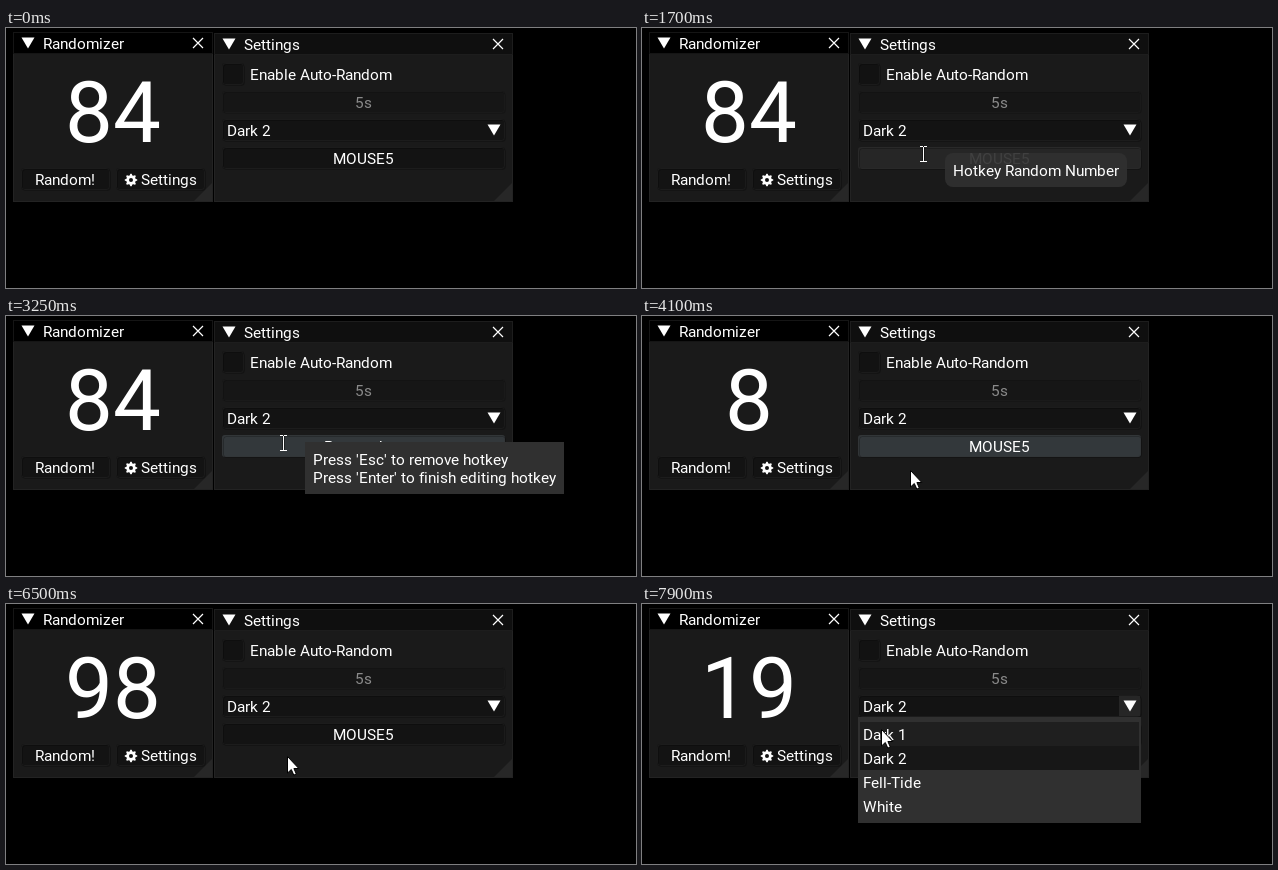
Recreate the animation shown at these times as an HTML page with a canvas. Size 630 px wide and 260 px high, loop 8000 ms.

```html
<!DOCTYPE html>
<html lang="en">
<head>
<meta charset="utf-8">
<title>Randomizer</title>
<style>
html, body { margin: 0; width: 100%; height: 100%; overflow: hidden; background: #000; }
canvas { display: block; }
</style>
</head>
<body>
<canvas id="stage" width="630" height="260"></canvas>
<script>
const ctx = document.getElementById('stage').getContext('2d');
const LOOP = 8000, STEP = 50;
const ENTER = 650, HINT = 1500, EDIT = 1900, PRESS = 3400, CONFIRM = 4600;
const TAPS = 5150, TAP_GAP = 337, LAST_TAP = 6700, THEME_HINT = 7200, OPEN = 7500;
const ROLLS = [84, 8, 5, 27, 53, 92, 98, 19];
const THEMES = ['Dark 1', 'Dark 2', 'Fell-Tide', 'White'];

const FONT = 'Roboto, "Open Sans", sans-serif', EM = 18 / 1.172;
const WHITE = '#fff', POPUP = '#303030', GLASS = 'rgba(48,48,48,.92)', BORDER = 'rgba(48,48,48,.45)',
      FRAME = 'rgba(13,13,13,.54)', HOVER = 'rgba(48,48,48,.54)', ACTIVE = '#33383b';

// Layout: every widget is one line of text plus padding.
const LINE = 18, PAD = 8, GAP = 6, FIELD = 22;
const MAIN = { x: 7, y: 4, w: 200, h: 170 }, SIDE = { x: 208, y: 5, w: 299, h: 169 };
const row = i => ({
  x: SIDE.x + PAD, y: SIDE.y + FIELD + PAD + i * (FIELD + GAP), w: SIDE.w - 2 * PAD, h: FIELD
});
const COMBO = row(2), HOTKEY = row(3);

const mix = (a, b, p) => a + (b - a) * p;
const easeOut = p => 1 - (1 - p) ** 2;
const inside = (p, b) => !!p && p.x >= b.x && p.x < b.x + b.w && p.y >= b.y && p.y < b.y + b.h;

// Pointer stops after its entry: start, end, x, y.
const GLIDES = [
  [HINT, 1700, 281, 126], [2700, 3250, 277, 127], [3700, 4100, 269, 155],
  [4900, 4950, 278, 154], [5500, 6200, 282, 153], [6950, 7250, 260, 109], [OPEN, 7900, 240, 126]
];

function pointerAt(t) {
  if (t < ENTER) return null;
  const q = easeOut(Math.min(1, (t - ENTER) / 800));
  const curve = (a, b, c) => mix(mix(a, b, q), mix(b, c, q), q);
  let x = curve(41, 220, 265), y = curve(0, 185, 123);
  for (const [start, end, toX, toY] of GLIDES) {
    if (t < start) break;
    const p = easeOut(Math.min(1, (t - start + STEP) / (end - start + STEP)));
    x = mix(x, toX, p);
    y = mix(y, toY, p);
  }
  return { x: Math.round(x), y: Math.round(y) };
}

function numberAt(t) {
  const taps = t < TAPS ? 0 : 1 + Math.min(4, Math.floor((t - TAPS + STEP / 2) / TAP_GAP));
  return ROLLS[(t >= PRESS) + taps + (t >= LAST_TAP)];
}

function rect(x, y, w, h, color) {
  ctx.fillStyle = color;
  ctx.fillRect(x, y, w, h);
}

function rounded(x, y, w, h, r) {
  ctx.beginPath();
  ctx.roundRect(x, y, w, h, r);
}

function fillPolygon(points, color) {
  ctx.beginPath();
  points.forEach(([x, y]) => ctx.lineTo(x, y));
  ctx.closePath();
  ctx.fillStyle = color;
  ctx.fill();
}

const advance = ch => Math.round(ctx.measureText(ch).width);

// Glyphs sit on whole pixels, as in a bitmap font atlas.
function text(str, x, y, { color = WHITE, center = false, size = EM } = {}) {
  ctx.font = `${size}px ${FONT}`;
  ctx.fillStyle = color;
  const chars = [...str];
  if (center) x = Math.floor(x - chars.reduce((sum, ch) => sum + advance(ch), 0) / 2);
  for (const ch of chars) {
    ctx.fillText(ch, x, y);
    x += advance(ch);
  }
}

function outline(x, y, w, h, color) {
  ctx.lineWidth = 1;
  ctx.strokeStyle = color;
  rounded(x + .5, y + .5, w - 1, h - 1, 3);
  ctx.stroke();
}

function frame({ x, y, w, h }, color = FRAME) {
  rounded(x, y, w, h, 3);
  ctx.fillStyle = color;
  ctx.fill();
  outline(x + 1, y + 1, w, h, 'rgba(0,0,0,.24)');
  outline(x, y, w, h, 'rgba(48,48,48,.29)');
}

function field(box, label, color, textColor) {
  frame(box, color);
  text(label, box.x + box.w / 2, box.y + 17, { color: textColor, center: true });
}

function downArrow(x, y) {
  fillPolygon([[x, y + 5.6], [x - 6.5, y - 5.6], [x + 6.5, y - 5.6]], WHITE);
}

function cross(x, y) {
  ctx.strokeStyle = WHITE;
  ctx.lineWidth = 1.2;
  ctx.beginPath();
  for (const s of [-5, 5]) {
    ctx.moveTo(x - 5, y - s);
    ctx.lineTo(x + 5, y + s);
  }
  ctx.stroke();
}

function panel(title, { x, y, w, h }, titleColor) {
  const right = x + w - 1, bottom = y + h - 1, grip = LINE;
  rect(x, y, w, h, '#1a1a1a');
  rect(x, y, w, FIELD, titleColor);
  rect(x + 1, y + FIELD - 1, w - 2, 1, BORDER);
  fillPolygon([[right, bottom], [right - grip, bottom], [right, bottom - grip]], '#272727');
  ctx.strokeStyle = BORDER;
  ctx.lineWidth = 1;
  ctx.strokeRect(x + .5, y + .5, w - 1, h - 1);
  downArrow(x + 15, y + 11);
  cross(x + w - 15, y + 11);
  text(title, x + 30, y + 17);
}

function gear(x, y) {
  ctx.fillStyle = WHITE;
  ctx.beginPath();
  for (let i = 0; i < 32; i++) {
    const a = (i - .5) * Math.PI / 16, r = i % 4 < 2 ? 6.3 : 4.7;
    ctx.lineTo(x + r * Math.cos(a), y + r * Math.sin(a));
  }
  ctx.closePath();
  ctx.moveTo(x + 2, y);
  ctx.arc(x, y, 2, 0, Math.PI * 2);
  ctx.fill('evenodd');
}

function tooltip(p, lines, width, radius, color) {
  const x = p.x + 22, y = p.y - 1;
  rounded(x, y, width, 2 * PAD + LINE * lines.length, radius);
  ctx.fillStyle = color;
  ctx.fill();
  lines.forEach((line, i) => text(line, x + PAD, y + 23 + LINE * i));
}

function arrowPointer({ x, y }) {
  const shape = [[0, 0], [0, 16.5], [3.8, 13], [6.3, 18.6], [8.8, 17.5], [6.4, 12], [11.3, 12]];
  fillPolygon(shape.map(([dx, dy]) => [x + dx - .5, y + dy - .5]), WHITE);
  ctx.strokeStyle = '#000';
  ctx.lineWidth = 1;
  ctx.stroke();
}

function textPointer({ x, y }) {
  rect(x - 1, y - 7, 3, 15, 'rgba(0,0,0,.45)');
  rect(x, y - 7, 1, 15, WHITE);
  for (const edge of [y - 8, y + 7]) {
    rect(x - 3, edge, 3, 1, WHITE);
    rect(x + 1, edge, 3, 1, WHITE);
  }
}

function randomizer(value) {
  panel('Randomizer', MAIN, '#000');
  text(String(value), MAIN.x + MAIN.w / 2, 114, { center: true, size: 100 / 1.172 });
  const left = { x: MAIN.x + PAD, y: 140, w: (MAIN.w - 2 * PAD - GAP) / 2, h: FIELD };
  const right = { ...left, x: left.x + left.w + GAP };
  field(left, 'Random!');
  frame(right);
  gear(right.x + 15, right.y + 12);
  text('Settings', right.x + 25, right.y + 17);
}

function settings(s) {
  panel('Settings', SIDE, '#0f0f0f');
  const check = { ...row(0), w: FIELD };
  frame(check);
  text('Enable Auto-Random', check.x + FIELD + GAP, check.y + 17);
  ctx.globalAlpha = .6;
  field(row(1), '5s', FRAME, '#d8d8d8');
  ctx.globalAlpha = 1;

  const button = COMBO.x + COMBO.w - FIELD;
  frame(COMBO, s.overCombo ? HOVER : FRAME);
  if (s.open) rect(button, COMBO.y + 1, FIELD - 1, FIELD - 2, '#262626');
  text('Dark 2', COMBO.x + 5, COMBO.y + 17);
  downArrow(button + 11, COMBO.y + 11);
  field(HOTKEY, s.listening ? 'Press a key' : 'MOUSE5',
        s.editing ? ACTIVE : s.overHotkey ? HOVER : FRAME);
}

function themeList(p) {
  const top = COMBO.y + COMBO.h, itemHeight = LINE + GAP;
  rect(COMBO.x, top, COMBO.w, THEMES.length * itemHeight + 10, POPUP);
  THEMES.forEach((name, i) => {
    const item = { x: COMBO.x + 2, y: top + 5 + itemHeight * i, w: COMBO.w - 4, h: itemHeight };
    const shade = name === 'Dark 2' ? '#171717' : inside(p, item) ? '#1f1f1f' : POPUP;
    rect(item.x, item.y, item.w, item.h, shade);
    text(name, COMBO.x + 5, item.y + LINE);
  });
}

function draw(time) {
  const t = Math.floor(time % LOOP / STEP) * STEP;
  const p = pointerAt(t);
  const open = t >= OPEN;
  const state = {
    open,
    overCombo: !open && inside(p, COMBO),
    overHotkey: !open && inside(p, HOTKEY),
    editing: t >= EDIT && t < CONFIRM,
    listening: t >= EDIT && t < PRESS
  };
  rect(0, 0, 630, 260, '#000');
  randomizer(numberAt(t));
  settings(state);
  if (open) themeList(p);

  if (state.overHotkey && state.editing) {
    tooltip(p, ["Press 'Esc' to remove hotkey", "Press 'Enter' to finish editing hotkey"], 259, 0, POPUP);
  } else if (state.overHotkey && t >= HINT && t < EDIT) {
    tooltip(p, ['Hotkey Random Number'], 182, 8, GLASS);
  } else if (state.overCombo && t >= THEME_HINT) {
    tooltip(p, ['Theme'], 62, 8, GLASS);
  }
  if (p) (state.overHotkey ? textPointer : arrowPointer)(p);
}

let began;
function tick(now) {
  began ??= now;
  draw(now - began);
  requestAnimationFrame(tick);
}
draw(0);
requestAnimationFrame(tick);
</script>
</body>
</html>
```
